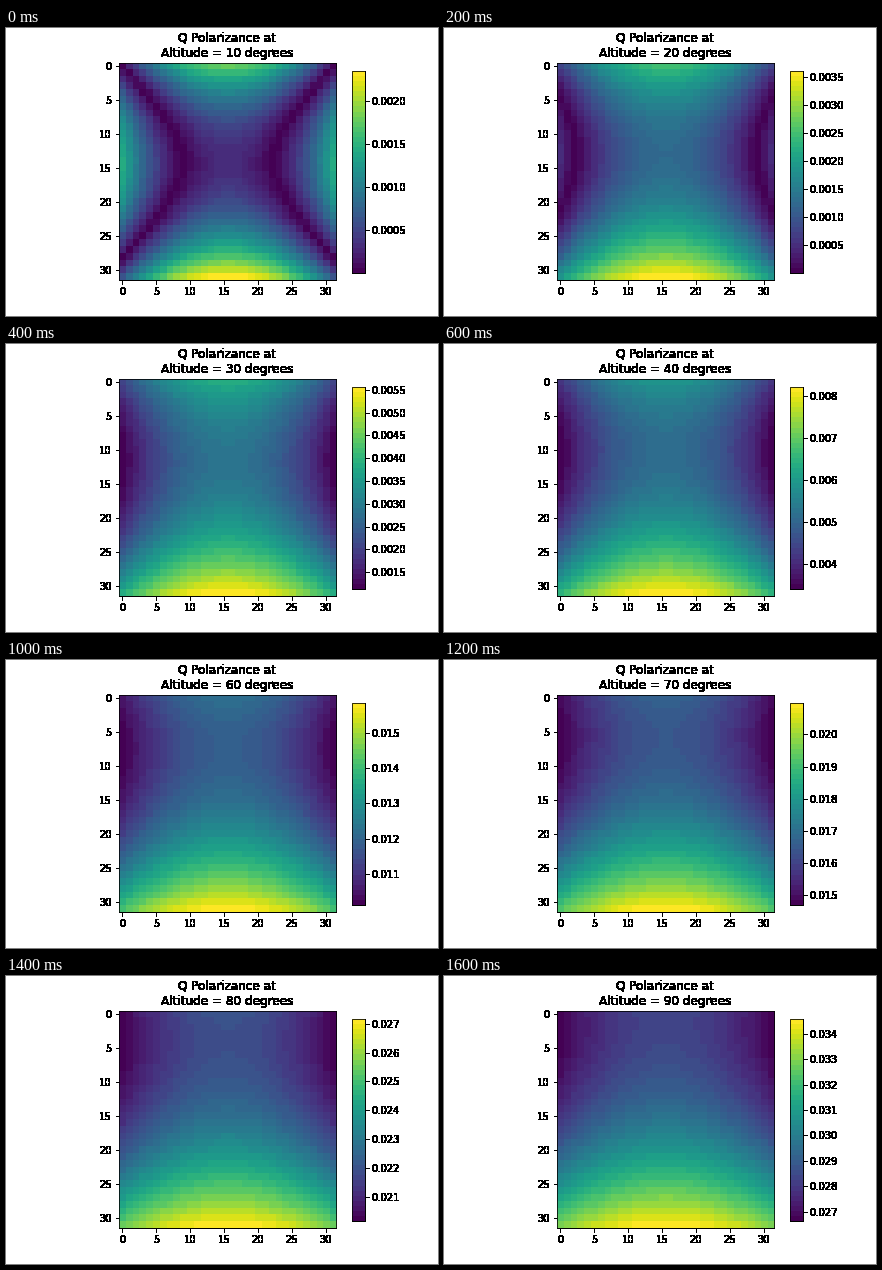
A matplotlib script that plays this animation: 432x288 px, repeating every 1.8 s.

```python
import matplotlib.pyplot as plt
import numpy as np
from matplotlib.animation import FuncAnimation

SIZE = 32
FRAMES = 9
CURVATURE = 7.2e-6

plt.rcParams.update({"font.family": "DejaVu Sans", "font.size": 10})


def polarizance(step):
    """Saddle-shaped Q map for an altitude of step * 10 degrees."""
    mid = (SIZE - 1) / 2
    y, x = np.mgrid[:SIZE, :SIZE]
    level = step**2 * (3.148e-4 + 3.86e-7 * step**2 + 6.3e-10 * step**4)
    row = mid - step * (1.28 + 4e-5 * step**4)
    return np.abs(level + CURVATURE * ((y - row) ** 2 - (x - mid) ** 2))


def solid(layer, dpi):
    """Make every touched pixel opaque, so glyph and line edges are hard."""
    layer[..., 3] = layer[..., 3] > 0
    return np.rint(layer * 255).astype(np.uint8), 0, 0


fig = plt.figure(figsize=(6, 4), dpi=72, facecolor="white")
ax = fig.add_axes([0.125, 0.125, 0.775, 0.755])
cax = fig.add_axes([0.8, 0.15, 0.03, 0.7])

image = ax.imshow(polarizance(1), cmap=plt.get_cmap("viridis", 40),
                  interpolation="nearest")
fig.colorbar(image, cax=cax)
title = ax.set_title("", fontsize=12)

for axes in (ax, cax):
    axes.set_agg_filter(solid)


def update(frame):
    step = frame + 1
    data = polarizance(step)
    image.set_data(data)
    image.set_clim(data.min(), data.max())
    title.set_text(f"Q Polarizance at\nAltitude = {step * 10} degrees")
    return image, title


anim = FuncAnimation(fig, update, frames=FRAMES, interval=200,
                     init_func=lambda: update(0), repeat=True,
                     repeat_delay=0, blit=False)
plt.show()
```
